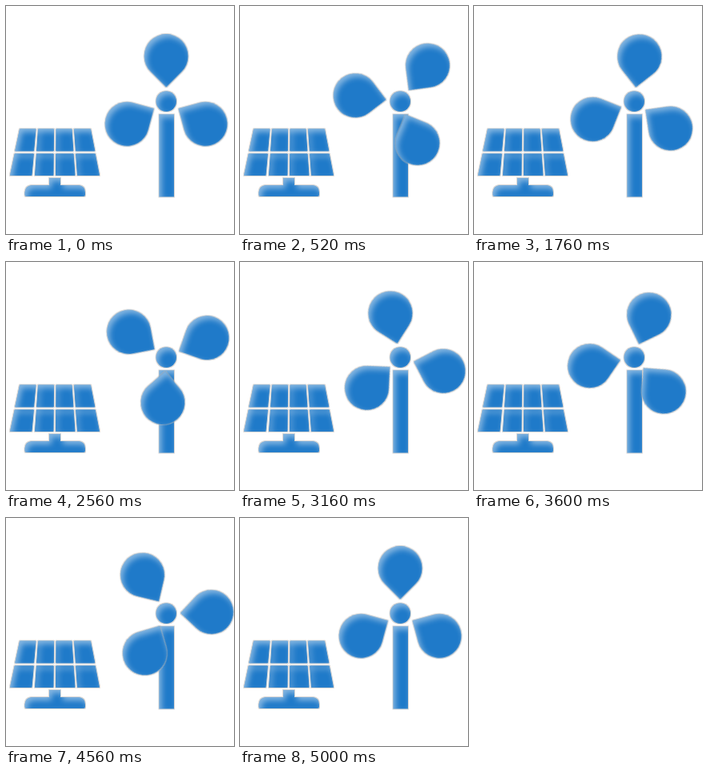
An HTML page that plays this animation: 285x285 px, repeating every 5040 ms.

```html
<!DOCTYPE html>
<html lang="en">
<head>
<meta charset="utf-8">
<title>Solar panel and wind turbine</title>
<style>
  html, body { margin: 0; width: 100%; height: 100%; overflow: hidden; background: #fff; }
  svg { display: block; width: 100%; height: 100%; }
  .part { fill: #1f7ac9; filter: url(#gloss); }
  .cells { stroke: #1f7ac9; stroke-width: 1; stroke-linejoin: round; }
  .rotor { animation: spin 5040ms infinite; }
  /* one turn in 125 steps of 40 ms, then one step at rest */
  @keyframes spin {
    0% { transform: rotate(0deg); animation-timing-function: steps(125, end); }
    99.20635% { transform: rotate(360deg); }
    100% { transform: rotate(360deg); }
  }
</style>
</head>
<body>
<svg viewBox="0 0 285 285">
  <defs>
    <filter id="gloss" filterUnits="userSpaceOnUse" x="0" y="0" width="285" height="285" color-interpolation-filters="sRGB">
      <feMorphology in="SourceAlpha" operator="dilate" radius="0.8" result="wide"/>
      <feGaussianBlur in="wide" stdDeviation="0.6" result="soft"/>
      <feFlood flood-color="#b9b6b2" flood-opacity="0.55"/>
      <feComposite in2="soft" operator="in" result="rim"/>
      <feGaussianBlur in="SourceAlpha" stdDeviation="3.5" result="blur"/>
      <feOffset in="blur" dx="2.5" dy="3.5" result="shift"/>
      <feFlood flood-color="#fff" flood-opacity="0.46"/>
      <feComposite in2="SourceAlpha" operator="in"/>
      <feComposite in2="shift" operator="out" result="shine"/>
      <feMerge>
        <feMergeNode in="rim"/>
        <feMergeNode in="SourceGraphic"/>
        <feMergeNode in="shine"/>
      </feMerge>
    </filter>
    <path id="blade" d="M0-17.8L-19.4-37.2A27.4 27.4 0 1 1 19.4-37.2Z"/>
  </defs>

  <g class="part cells">
    <path d="M17.5 154H37L34.6 181H11.7ZM40.5 154H59.5L59.3 181H38.6ZM63 154H82L83.9 181H62.8ZM85.5 154H105.5L110.8 181H87.4Z"/>
    <path d="M11.1 185H34.4L32 211.5H5.5ZM38.4 185H59.2L59 211.5H36.5ZM62.7 185H84.1L86 211.5H62.5ZM87.6 185H111.3L116.5 211.5H89.5Z"/>
  </g>
  <path class="part" d="M54 215H68V224H91Q99 225 99 233V236Q99 238 97 238H25.500Q23.500 238 23.500 236V233Q24 225 32 224H54Z"/>

  <rect class="part" x="191.500" y="135.500" width="18.500" height="103"/>
  <g class="part">
    <g transform="translate(200.300 119.300)">
      <g class="rotor">
        <use href="#blade"/>
        <use href="#blade" transform="rotate(120)"/>
        <use href="#blade" transform="rotate(240)"/>
      </g>
    </g>
  </g>
  <circle class="part" cx="200.300" cy="119.300" r="12.700"/>
</svg>
</body>
</html>
```
